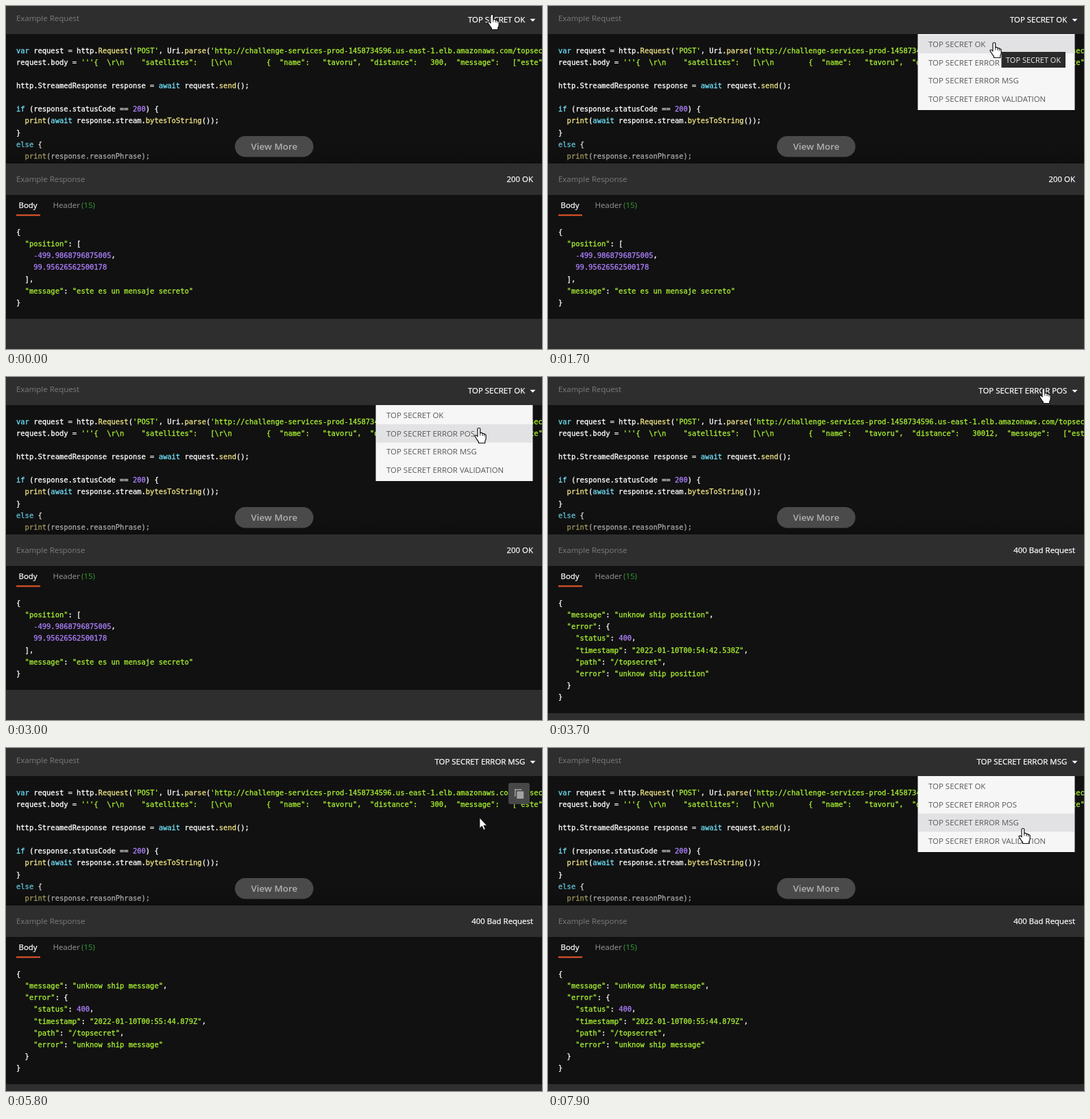
Recreate the animation shown at these times as an HTML page. Size 782x501 px, loop 8000 ms.

```html
<!DOCTYPE html>
<html lang="en">
<head>
<meta charset="utf-8">
<title>API example</title>
<style>
  html, body { margin: 0; width: 100%; height: 100%; overflow: hidden; background: #2e2e2f; }
  svg { display: block; width: 782px; height: 501px; }
  text { font: 11.45px "Open Sans", sans-serif; white-space: pre; }
  .code { font: 10.46px "DejaVu Sans Mono", monospace; fill: #fff; stroke: #fff; stroke-width: .3; }
  .str { fill: #a9f032; stroke: #a9f032; }
  .key { fill: #6fe0f8; stroke: #6fe0f8; }
  .num { fill: #ae81ff; stroke: #ae81ff; }
  .fn { fill: #f0e585; stroke: #f0e585; }
  .bright { fill: #fff; stroke: #fff; stroke-width: .25; }
</style>
</head>
<body>
<svg viewBox="0 0 782 501">
  <defs>
    <linearGradient id="fade" x1="0" y1="0" x2="0" y2="1">
      <stop offset="0" stop-color="#111" stop-opacity="0"/>
      <stop offset="1" stop-color="#0b0b0b" stop-opacity=".5"/>
    </linearGradient>
  </defs>
  <rect width="782" height="501" fill="#2e2e2f"/>
  <rect y="41" width="782" height="189" fill="#111"/>
  <text x="15" y="22" fill="#7c7c7c">Example Request</text>
  <text id="title" class="bright" x="757.3" y="23.7" text-anchor="end"></text>
  <path d="M764.5 18.7h8l-4 4z" fill="#fff"/>
  <g id="request"></g>
  <rect y="190" width="782" height="40" fill="url(#fade)"/>
  <rect x="334" y="190" width="114.5" height="30.5" rx="15.2" fill="#4a4a4a"/>
  <text x="391.3" y="209.7" fill="#b0b0b0" text-anchor="middle" style="font-size:13.4px;font-weight:600">View More</text>

  <text x="15" y="256.7" fill="#7c7c7c">Example Response</text>
  <text id="status" class="bright" x="769" y="256.7" text-anchor="end"></text>
  <rect id="panel" y="276" width="782" fill="#111"/>
  <text class="bright" x="18.5" y="295">Body</text>
  <rect x="15" y="304.5" width="35" height="2" fill="#f0592b"/>
  <text x="68.5" y="295" fill="#999">Header <tspan x="110" fill="#37a037">(15)</tspan></text>
  <g id="response"></g>

  <g id="copy">
    <rect x="733" y="51" width="31" height="31" rx="3" fill="#474747"/>
    <path d="M742.8 71V60.8h9.5" fill="none" stroke="#a2a2a2" stroke-width="1.5"/>
    <rect x="745.3" y="63.3" width="10" height="10.8" rx=".8" fill="#a2a2a2"/>
  </g>
  <g id="menu">
    <rect x="539.5" y="41" width="229" height="111" fill="#f6f6f7"/>
    <rect id="hover" x="540.5" width="227.5" height="26.6" fill="#e2e2e4"/>
    <g id="items" fill="#585858"></g>
  </g>
  <g id="tip">
    <rect x="661.5" y="67" width="93.5" height="23" fill="#2b2b2b"/>
    <text x="668" y="82.7" fill="#f2f2f2" style="font-size:11px">TOP SECRET OK</text>
  </g>
  <g id="cursor" fill="#fff" stroke="#111" stroke-linejoin="round">
    <g id="hand">
      <path d="M-2 2.2Q-2 .5 0 .5T1.8 2.2V7.6Q4.9 7 5.2 8.6 7.6 8.1 7.9 9.6 10.2 9.2 10.2 11.5V16Q10 18 8.8 19.5V22.5H-.5V20.5Q-2.5 18.5-4 15.5L-5.8 12.8Q-6.3 11-4.6 11-3.3 11.2-2 13Z" stroke-width="1.2"/>
      <path d="M1.8 7.6V11.5M5.2 8.6V12M7.9 9.6V12.5" fill="none" stroke-width=".9"/>
    </g>
    <path id="arrow" d="M0 0V15.2L3.5 12 5.9 17.6 8.3 16.6 5.9 11.2H10.6Z" stroke-width=".8"/>
  </g>
</svg>
<script>
const LOOP = 8000, ROW = 26.6, MENU_TOP = 42.5;
const $ = id => document.getElementById(id);
const show = (id, on) => $(id).setAttribute('visibility', on ? 'visible' : 'hidden');
const attr = (id, name, value) => $(id).setAttribute(name, value);

const TOKEN = /('''.*|'[^']*'|"[^"]*")|\b(var|await|if|else)\b|(-?\b\d[\d.]*)|(\w+)(?=\()/g;
const paint = line => line.replace(TOKEN, (token, str, key, num) =>
  `<tspan class="${str ? 'str' : key ? 'key' : num ? 'num' : 'fn'}">${token}</tspan>`);
const block = (source, y) => source.split('\n').map((line, i) =>
  `<text class="code" x="15" y="${y + i * 17.13}">${paint(line)}</text>`).join('');

const request = distance => String.raw`var request = http.Request('POST', Uri.parse('http://challenge-services-prod-1458734596.us-east-1.elb.amazonaws.com/topsecret'));
request.body = '''{  \r\n    "satellites":   [\r\n        {  "name":   "tavoru",  "distance":   ${distance},  "message":   ["este",

http.StreamedResponse response = await request.send();

if (response.statusCode == 200) {
  print(await response.stream.bytesToString());
}
else {
  print(response.reasonPhrase);`;

const failure = (message, time) => `{
  "message": "${message}",
  "error": {
    "status": 400,
    "timestamp": "2022-01-10T00:${time}Z",
    "path": "/topsecret",
    "error": "${message}"
  }
}`;

const success = `{
  "position": [
    -499.9868796875005,
    99.95626562500178
  ],
  "message": "este es un mensaje secreto"
}`;

const names = ['OK', 'ERROR POS', 'ERROR MSG', 'ERROR VALIDATION'].map(n => 'TOP SECRET ' + n);
const examples = [
  { distance: 300, status: '200 OK', body: success, bottom: 457 },
  { distance: 30012, status: '400 Bad Request', body: failure('unknow ship position', '54:42.538'), bottom: 491 },
  { distance: 300, status: '400 Bad Request', body: failure('unknow ship message', '55:44.879'), bottom: 491 }
];

$('items').innerHTML = names.map((name, i) =>
  `<text x="555" y="${60 + i * ROW}">${name}</text>`).join('');

// Pointer stops: time, x, y
const stops = [
  [0, 709, 12], [500, 709, 12], [1250, 651, 53], [1750, 651, 53],
  [2200, 731, 12], [2400, 731, 12], [2800, 690, 74], [3100, 690, 74],
  [3700, 723, 16], [4050, 723, 16], [4600, 684, 97], [4900, 686, 100],
  [5300, 691, 102], [5820, 691, 102], [6500, 704, 17], [6850, 704, 17],
  [7450, 709, 120], [7560, 709, 120], [7900, 693, 117], [LOOP, 693, 117]
];

function pointer(t) {
  const i = stops.findIndex(stop => stop[0] > t);
  const [t0, x0, y0] = stops[i - 1], [t1, x1, y1] = stops[i];
  const p = (t - t0) / (t1 - t0), e = p * p * (3 - 2 * p);
  return [x0 + (x1 - x0) * e, y0 + (y1 - y0) * e];
}

const between = (t, a, b) => t >= a && t < b;
let current = -1;

function select(index) {
  if (index === current) return;
  current = index;
  const { distance, status, body, bottom } = examples[index];
  $('title').textContent = names[index];
  $('status').textContent = status;
  $('request').innerHTML = block(request(distance), 68.6);
  $('response').innerHTML = block(body, 334);
  attr('panel', 'height', bottom - 276);
}

function draw(t) {
  select(t < 3100 ? 0 : t < 4900 ? 1 : 2);
  const open = between(t, 600, 3100) || between(t, 4050, 4900) || t >= 6800;
  const [x, y] = pointer(t);
  const row = Math.floor((y - MENU_TOP) / ROW);
  const hand = open || y < 41;
  show('menu', open);
  show('hover', open && row >= 0);
  attr('hover', 'y', MENU_TOP + row * ROW);
  show('tip', between(t, 1600, 1800));
  show('copy', !hand);
  show('hand', hand);
  show('arrow', !hand);
  attr('cursor', 'transform', `translate(${x} ${y})`);
}

function tick(now) {
  draw(now % LOOP);
  requestAnimationFrame(tick);
}
draw(0);
requestAnimationFrame(tick);
</script>
</body>
</html>
```
